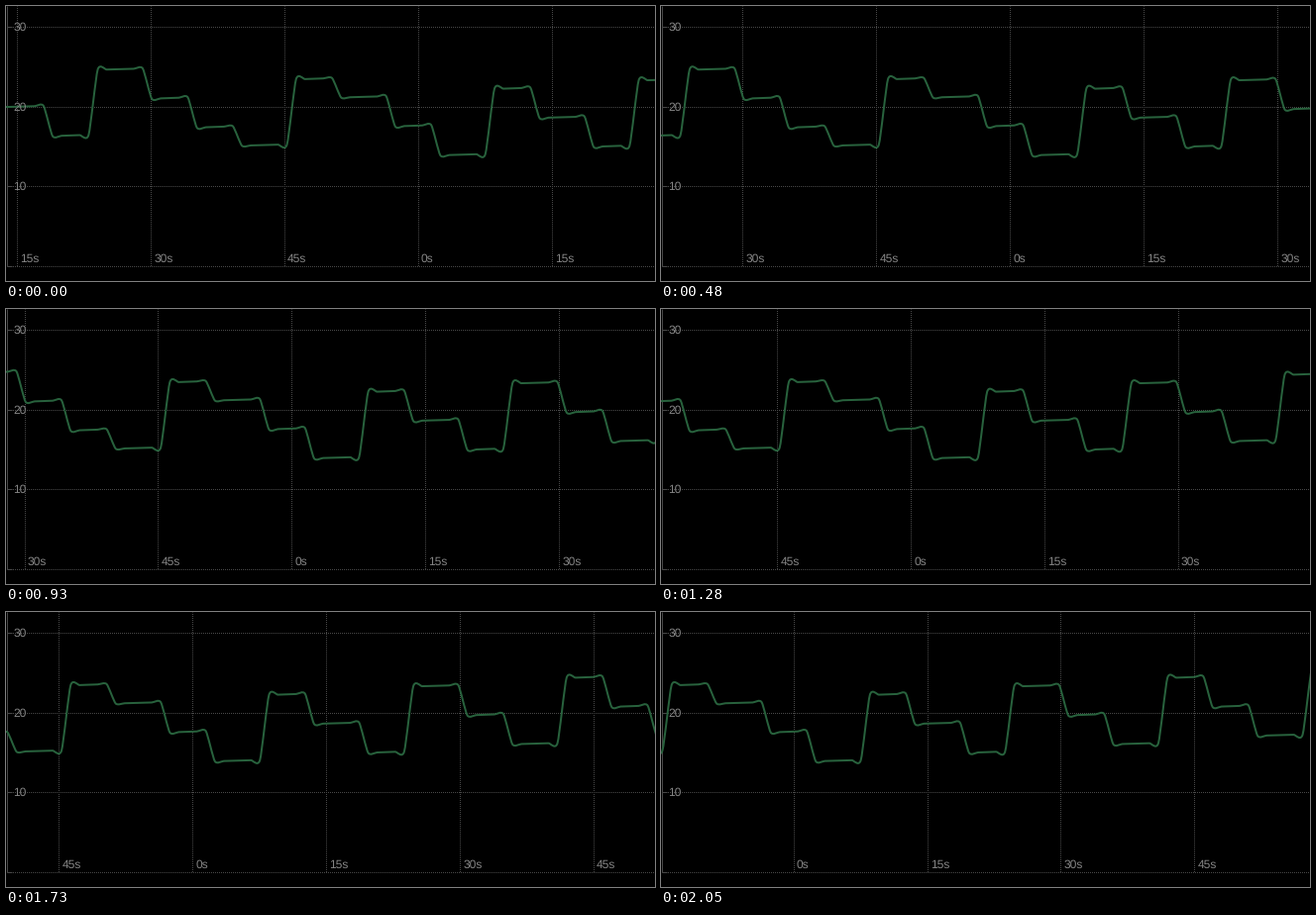
Animation, 655 px wide and 278 px high, one loop 2.07 s. Source, as a matplotlib script:

```python
import matplotlib.pyplot as plt
import numpy as np
from matplotlib.animation import FuncAnimation
from matplotlib.patches import FancyBboxPatch, PathPatch
from matplotlib.path import Path

W, H, DPI = 655, 278, 64
LOOP, TICK = 2070, 10
PT = 72 / DPI  # points per pixel
GRID, LABEL, GREEN = "#484848", "#858585", "#28623d"
BOTTOM, UNIT = 263, 8.07  # zero line and pixels per unit
POLL = 9.1  # pixels between two samples

# Heap changes: down, small drop, up
MOVES = {"d": 29.2, "s": 18.3, "u": -67}
PATTERN = "duddsusdd" + "udd" * 3 + "u"

# Samples received at a few moments (ms)
KEY_TIMES = [0, 40, 320, 680, 930, 1070, 1280, 1730, 2050]
KEY_POLLS = [0, 1, 5, 10, 14, 15, 18, 25, 31]

plt.rcParams["text.hinting"] = "none"


def heap_points():
    """Each level lasts about 5.5 samples and creeps up slightly."""
    levels = 102.3 + np.cumsum([0] + [MOVES[m] for m in PATTERN])
    points = []
    for k, level in enumerate(levels, start=-1):
        first, after = (int(np.floor(5.46 * j + 0.12)) for j in (k, k + 1))
        for n in range(first, after):
            creep = 1.3 * (n - first) / (after - first - 1)
            points.append((47 + POLL * n, level - creep))
    return np.array(points)


def cardinal_path(points, tension=0.11):
    tangents = np.zeros_like(points)
    tangents[1:-1] = tension * (points[2:] - points[:-2])
    verts = [points[0]]
    for i in range(len(points) - 1):
        verts += [points[i] + tangents[i],
                  points[i + 1] - tangents[i + 1], points[i + 1]]
    return np.array(verts), [Path.MOVETO] + [Path.CURVE4] * (len(verts) - 1)


fig = plt.figure(figsize=(W / DPI, H / DPI), dpi=DPI, facecolor="black")
ax = fig.add_axes([0, 0, 1, 1])
ax.set(xlim=(0, W), ylim=(H, 0))
ax.axis("off")


def rule(xs, ys, dotted=True):
    style = (0.5, (1, 1)) if dotted else "-"
    return ax.plot(xs, ys, color=GRID, lw=PT, ls=style, snap=True,
                   dash_capstyle="butt", solid_capstyle="butt", zorder=1)[0]


def label(x, y, text, color=LABEL, zorder=3):
    return ax.text(x, y, text, color=color, family="Liberation Sans",
                   size=12 * PT, va="baseline", zorder=zorder, clip_on=True)


rule([1, 1], [0, BOTTOM], dotted=False)
for value in (0, 10, 20, 30):
    y = BOTTOM - value * UNIT
    rule([1, W], [y, y])
    rule([1, 6], [y, y], dotted=False)
    if value:
        label(7.5, y + 4, str(value))

marks = []
for k in range(7):
    x = 11 + 134.9 * k
    marks.append((x, rule([x, x], [0, BOTTOM]),
                  label(x, 259.3, f"{(15 + 15 * k) % 60}s")))

verts, codes = cardinal_path(heap_points())
curve = PathPatch(Path(verts, codes), fill=False, ec=GREEN, lw=2 * PT,
                  joinstyle="round", zorder=2)
ax.add_patch(curve)

tooltip = [
    FancyBboxPatch((614.5, 58.5), 72, 16, fc="white", ec="none", alpha=0.82,
                   boxstyle="round,pad=2.5,rounding_size=3", zorder=4),
    label(615.5, 70, "Heap Used", "black", 5),
]
ax.add_patch(tooltip[0])


def update(frame):
    t = frame * TICK
    shift = POLL * np.floor(np.interp(t, KEY_TIMES, KEY_POLLS) + 1e-6)
    curve.set_path(Path(verts - [shift, 0], codes))
    for x, line, text in marks:
        left = x - shift
        line.set_xdata([left, left])
        text.set_x(left + 3.3)
        for part in (line, text):
            part.set_visible(1 < left < W)
    for part in tooltip:
        part.set_visible(320 <= t < 410)
    return []


anim = FuncAnimation(fig, update, frames=LOOP // TICK, interval=TICK,
                     repeat=True, repeat_delay=0, blit=False)
plt.show()
```
